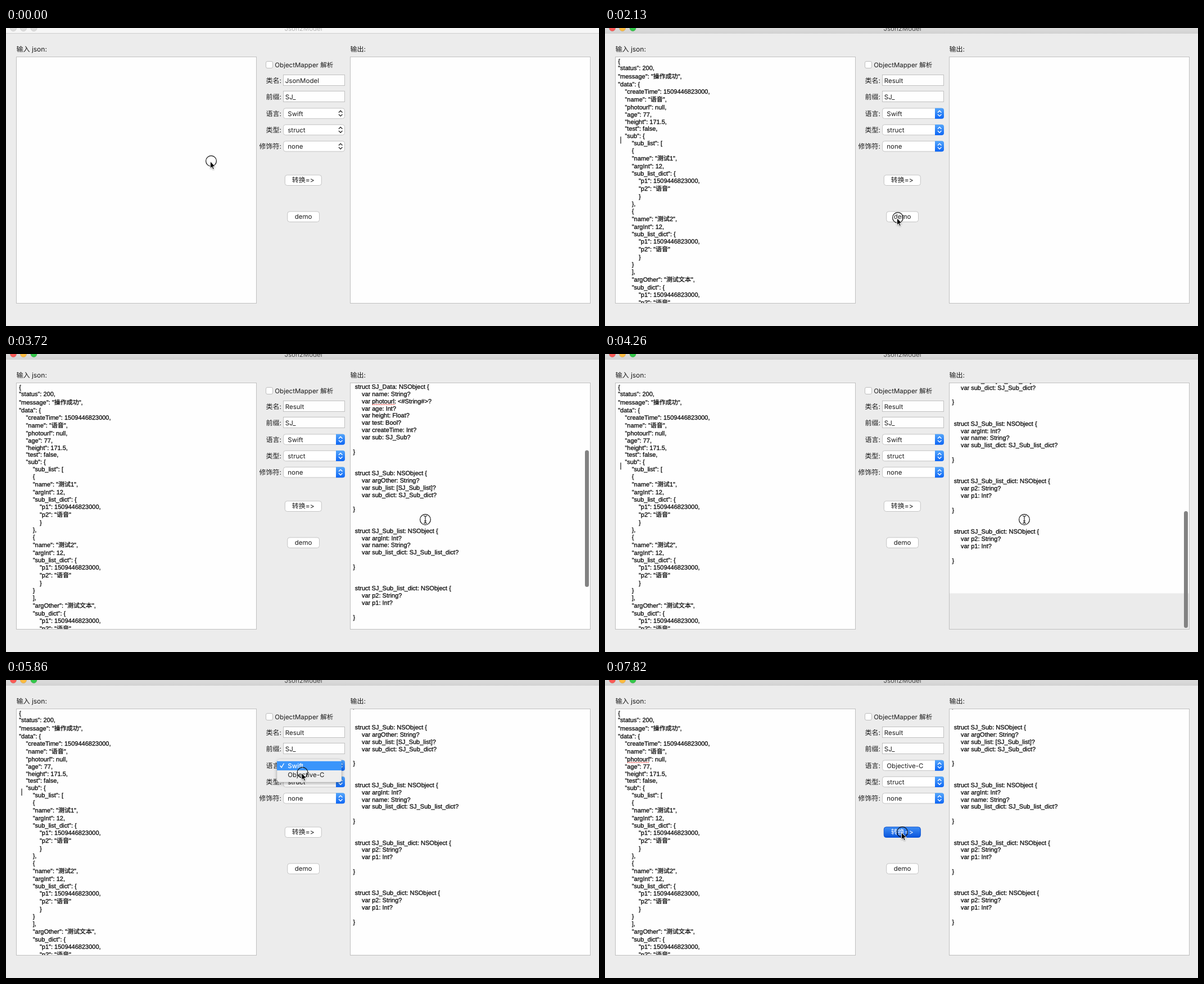
An HTML page that plays this animation: 1055 by 531 pixels, repeating every 8000 ms.

```html
<!DOCTYPE html>
<html lang="zh">
<head>
<meta charset="utf-8">
<style>
  html, body { margin: 0; width: 100%; height: 100%; overflow: hidden; background: #ececec; }
  svg { display: block; width: 1055px; height: 531px; }
  text { text-rendering: geometricPrecision; font-variant-ligatures: none; }
  .ui { font: 11.5px Inter, "Noto Sans CJK SC", "Noto Sans CJK", sans-serif; font-feature-settings: "calt" 0; fill: #1a1a1a; }
  .cjk { font-size: 12px; }
  .code { font: 11px "Liberation Sans", "Noto Sans CJK SC", "Noto Sans CJK", sans-serif; fill: #000; stroke: #000; stroke-width: .25; }
  .end { text-anchor: end; }
  .mid { text-anchor: middle; }
  .box { fill: #fefefe; stroke: #c0c0c0; }
  .spell { stroke: #f0382f; stroke-width: 1.5; stroke-dasharray: 1.6 1.4; }
  .chev { fill: none; stroke-width: 1.4; stroke-linecap: round; stroke-linejoin: round; }
</style>
</head>
<body>
<svg id="stage" viewBox="0 0 1055 531">
  <defs>
    <linearGradient id="bar" x2="0" y2="1"><stop stop-color="#dcdcdc"/><stop offset="1" stop-color="#d3d3d3"/></linearGradient>
    <linearGradient id="blue" x2="0" y2="1"><stop stop-color="#55a6fb"/><stop offset="1" stop-color="#0d66f5"/></linearGradient>
    <linearGradient id="press" x2="0" y2="1"><stop stop-color="#3f8ef5"/><stop offset="1" stop-color="#0a55dc"/></linearGradient>
    <filter id="soft" x="-20%" y="-20%" width="140%" height="160%"><feDropShadow dx="0" dy="3" stdDeviation="3" flood-opacity=".3"/></filter>
    <filter id="drop" x="-50%" y="-50%" width="200%" height="200%"><feDropShadow dx="0" dy="1" stdDeviation=".8" flood-opacity=".35"/></filter>
    <clipPath id="clipIn"><path d="M19 52H445V490H19Z"/></clipPath>
    <clipPath id="clipOut"><path d="M613 52H1039V490H613Z"/></clipPath>
  </defs>
</svg>
<script>
const LOOP = 8000, STEP = 177.6, LINE = 12.83, INDENT = 3.057;
const TOP = 62.5, BOTTOM = 333.4;
const stage = document.getElementById('stage');

const input = `{
"status": 200,
"message": "操作成功",
"data": {
    "createTime": 1509446823000,
    "name": "语音",
    "photourl": null,
    "age": 77,
    "height": 171.5,
    "test": false,
    "sub": {
        "sub_list": [
        {
        "name": "测试1",
        "argInt": 12,
        "sub_list_dict": {
            "p1": 1509446823000,
            "p2": "语音"
            }
        },
        {
        "name": "测试2",
        "argInt": 12,
        "sub_list_dict": {
            "p1": 1509446823000,
            "p2": "语音"
            }
        }
        ],
        "argOther": "测试文本",
        "sub_dict": {
            "p1": 1509446823000,
            "p2": "语音"`;

const structs = [
  ['Result', 'status: Int', 'message: String', 'data: SJ_Data'],
  ['Data', 'name: String', 'photourl: <#String#>', 'age: Int', 'height: Float', 'test: Bool', 'createTime: Int', 'sub: SJ_Sub'],
  ['Sub', 'argOther: String', 'sub_list: [SJ_Sub_list]', 'sub_dict: SJ_Sub_dict'],
  ['Sub_list', 'argInt: Int', 'name: String', 'sub_list_dict: SJ_Sub_list_dict'],
  ['Sub_list_dict', 'p2: String', 'p1: Int'],
  ['Sub_dict', 'p2: String', 'p1: Int'],
];
const header = '//\n//  SJ_Result.swift\n//  Json2Model\n//\n\nimport Foundation\n\n\n';
const output = header + structs.map(([name, ...vars]) =>
  ` struct SJ_${name}: NSObject {\n` + vars.map(v => `     var ${v}?\n`).join('') + '\n}\n').join('\n\n');

const esc = s => s.replace(/&/g, '&amp;').replace(/</g, '&lt;').replace(/>/g, '&gt;');
const text = (x, y, s, cls = 'ui', more = '') => `<text x="${x}" y="${y}" class="${cls}" ${more}>${esc(s)}</text>`;
const rect = (x, y, w, h, r, more) => `<rect x="${x}" y="${y}" width="${w}" height="${h}" rx="${r}" ${more}/>`;

// Lines holding Chinese glyphs are a little taller.
function codeLines(src, x, y) {
  return src.split('\n').map((line, i) => {
    const extra = /[\u4e00-\u9fff]/.test(line) ? 1.35 : 0;
    if (i) y += LINE;
    y += extra;
    const body = line.trimStart();
    const out = body ? text((x + INDENT * (line.length - body.length)).toFixed(2), y.toFixed(2), body, 'code') : '';
    y += extra;
    return out;
  }).join('');
}

const chevrons = (y, color) =>
  `<path class="chev" stroke="${color}" d="M592.3 ${y - 2}l2.9 -2.9l2.9 2.9M592.3 ${y + 2}l2.9 2.9l2.9 -2.9"/>`;

function popup(y, value, id) {
  return rect(493.5, y - 9.2, 109, 18.4, 4, 'fill="#fff" stroke="#c4c4c4"') +
    text(501.3, y + 4.3, value, 'ui', id ? `id="${id}"` : '') +
    `<g class="idle">${chevrons(y, '#333')}</g>` +
    `<g class="active"><path fill="url(#blue)" d="M587 ${y - 9.5}h12a4 4 0 0 1 4 4v11a4 4 0 0 1 -4 4h-12z"/>${chevrons(y, '#fff')}</g>`;
}

function button(id, x, y, w, label, cls) {
  const face = more => rect(x, y, w, 18.5, 4, more);
  const cx = x + w / 2;
  return face('fill="#fff" stroke="#c4c4c4"') + text(cx, y + 13.3, label, cls) +
    `<g id="${id}">${face('fill="url(#press)" stroke="#0b56d8"')}${text(cx, y + 13.3, label, cls, 'style="fill:#fff"')}</g>`;
}

const lights = colors => [13, 31, 49.5].map((x, i) =>
  `<circle cx="${x}" cy="0" r="5.7" fill="${colors[i]}" stroke="#000" stroke-opacity=".1"/>`).join('');

const title = color => text(529, 4.8, 'Json2Model', 'ui mid', `style="fill:${color}"`);

const fields = [['类名:', 98], ['前缀:', 127.3], ['语言:', 156.8], ['类型:', 186], ['修饰符:', 215.4]];

stage.insertAdjacentHTML('beforeend', `
  <rect width="1055" height="531" fill="#ececec"/>
  <g class="idle">${rect(0, 0, 1055, 9, 0, 'fill="#f6f6f6"')}${lights(['#dcdcdc', '#dcdcdc', '#dcdcdc'])}${title('#b5b5b5')}</g>
  <g class="active">${rect(0, 0, 1055, 9, 0, 'fill="url(#bar)"')}${lights(['#fc5b57', '#fdbc40', '#34c84a'])}${title('#4b4b4b')}</g>
  <path d="M0 9.5H1055" stroke="#cfcfcf"/>
  ${text(18.5, 41.5, '输入 json:', 'ui cjk')}${text(612.5, 41.5, '输出:', 'ui cjk')}
  ${rect(18.5, 51.5, 427, 439, 0, 'class="box"')}
  ${rect(612.5, 51.5, 427, 439, 0, 'class="box"')}
  <g id="in" clip-path="url(#clipIn)">${codeLines(input, 23.2, TOP)}
    <path id="spellIn" class="spell" d="M40 147H77.5"/></g>
  <path id="caret" d="M28 193.5V206" stroke="#000" stroke-width="1.1"/>
  <g id="out" clip-path="url(#clipOut)">
    <rect x="613" y="52" width="426" height="438" fill="#ebebeb"/>
    <g id="page"><rect x="613" y="-348" width="426" height="1171" fill="#fefefe"/>
      ${codeLines(output, 617.6, TOP)}
      <path class="spell" d="M652 ${(TOP + 18 * LINE + 2.3).toFixed(1)}H692"/></g>
    <rect id="thumb" x="1030" width="7" rx="3.5" fill="#828282"/>
  </g>
  ${rect(462.5, 59.5, 12, 12, 2.5, 'fill="#fff" stroke="#bdbdbd"')}
  ${text(478.3, 69.8, 'ObjectMapper 解析')}
  ${fields.map(([s, y]) => text(490, y, s, 'ui cjk end')).join('')}
  ${rect(493.5, 83.5, 109, 19, 0, 'class="box"')}${rect(493.5, 112.5, 109, 19, 0, 'class="box"')}
  ${text(496.8, 98, 'JsonModel', 'ui', 'id="name"')}${text(496.8, 127.3, 'SJ_')}
  ${popup(152.2, 'Swift', 'lang')}${popup(181.5, 'struct')}${popup(210.8, 'none')}
  ${button('convert', 496.3, 262, 65, '转换=>', 'ui cjk mid')}
  ${button('demo', 500.8, 327, 56.7, 'demo', 'ui mid')}
  <g id="menu">
    ${rect(482, 141, 115, 41, 4.5, 'fill="#eeeeee" stroke="#000" stroke-opacity=".12" stroke-width=".6" filter="url(#soft)"')}
    <rect id="hilite" x="482" width="115" height="16.3" fill="#3a95fb"/>
    <path id="tick" class="chev" d="M488 153l2.2 3l4 -7"/>
    ${text(501.3, 156.7, 'Swift', 'ui', 'id="row0"')}${text(501.3, 173.3, 'Objective-C', 'ui', 'id="row1"')}
  </g>
  <g id="cursor">
    <circle r="9.4" fill="none" stroke="#111" stroke-width="1.2"/>
    <path id="arrow" transform="translate(-1.5 .8)" filter="url(#drop)" d="M0 0V12.4L2.8 9.8L4.7 14.1L6.7 13.2L4.9 9H8.7Z" stroke="#fff" stroke-width=".9"/>
    <path id="beam" fill="none" stroke="#111" stroke-width="1.1" d="M-3 -6.5Q0 -6.5 0 -4.5V4.5Q0 6.5 -3 6.5M3 -6.5Q0 -6.5 0 -4.5M0 4.5Q0 6.5 3 6.5M-2 2.5H2"/>
  </g>`);

// [step, x, y]
const path = [[0, 365, 237], [2, 365, 237], [5, 500, 378], [6, 515, 362], [8, 521, 338], [13, 521, 338],
  [15, 528, 273], [17, 530, 272], [18, 836, 300], [19, 752, 296], [20, 746, 295], [24, 746, 295],
  [25, 700, 282], [26, 612, 255], [28, 548, 178], [29, 530, 154], [31, 528, 152], [32, 528, 154],
  [33, 527.5, 165], [34, 528, 169], [37, 528, 169], [39, 528, 262], [40, 528, 300], [41, 528, 292],
  [43, 529, 273], [44, 529, 271]];
const scroll = [[18, 0], [19, 20], [20, 105], [21, 205.6], [22, 320], [23, 388], [24, 396.6], [25, 352], [26, 335.4], [27, BOTTOM]];

function at(keys, n) {
  const i = keys.findIndex(k => k[0] > n);
  if (i < 0) return keys[keys.length - 1].slice(1);
  if (i === 0) return keys[0].slice(1);
  const a = keys[i - 1], b = keys[i], p = (n - a[0]) / (b[0] - a[0]);
  return a.slice(1).map((v, j) => v + (b[j + 1] - v) * p);
}

const $ = id => document.getElementById(id);
const show = (el, on) => { el.style.display = on ? '' : 'none'; };
const set = (id, attrs) => { for (const k in attrs) $(id).setAttribute(k, attrs[k]); };
const between = (n, a, b) => n >= a && n <= b;

function caretOn(n) {
  if (n < 10) return false;
  if (n < 31) return n % 6 < 3;
  return n < 36 || (n - 36) % 6 >= 3;
}

function draw(n) {
  const active = n >= 2;
  document.querySelectorAll('.active').forEach(el => show(el, active));
  document.querySelectorAll('.idle').forEach(el => show(el, !active));

  show($('in'), n >= 10);
  show($('spellIn'), n >= 38);
  show($('caret'), caretOn(n));
  $('name').textContent = n >= 10 ? 'Result' : 'JsonModel';
  $('lang').textContent = n >= 37 ? 'Objective-C' : 'Swift';
  show($('demo'), n === 9);
  show($('convert'), n === 16 || n >= 44);

  const [s] = at(scroll, n), over = Math.max(0, s - BOTTOM);
  const size = 243.5 - over * 0.56;
  show($('out'), n >= 17);
  set('page', { transform: `translate(0 ${-s})` });
  set('thumb', { y: over ? 488 - size : 54 + s / BOTTOM * 190.5, height: size, opacity: n === 31 ? 0.5 : 1 });
  show($('thumb'), between(n, 19, 31));

  const row = n >= 34 ? 1 : 0;
  show($('menu'), between(n, 32, 36));
  set('hilite', { y: row ? 161 : 144.7 });
  set('tick', { stroke: row ? '#222' : '#fff' });
  $('row0').style.fill = row ? '' : '#fff';
  $('row1').style.fill = row ? '#fff' : '';
  $('row0').style.fontWeight = row ? '' : 500;

  const [x, y] = at(path, n), beam = x > 618;
  set('cursor', { transform: `translate(${x} ${y})` });
  show($('beam'), beam);
  show($('arrow'), !beam);
}

let last = -1;
function tick() {
  const t = performance.now() % LOOP;
  const n = Math.min(44, Math.floor((t + 15) / STEP));
  if (n !== last) draw(last = n);
  requestAnimationFrame(tick);
}
tick();
</script>
</body>
</html>
```
